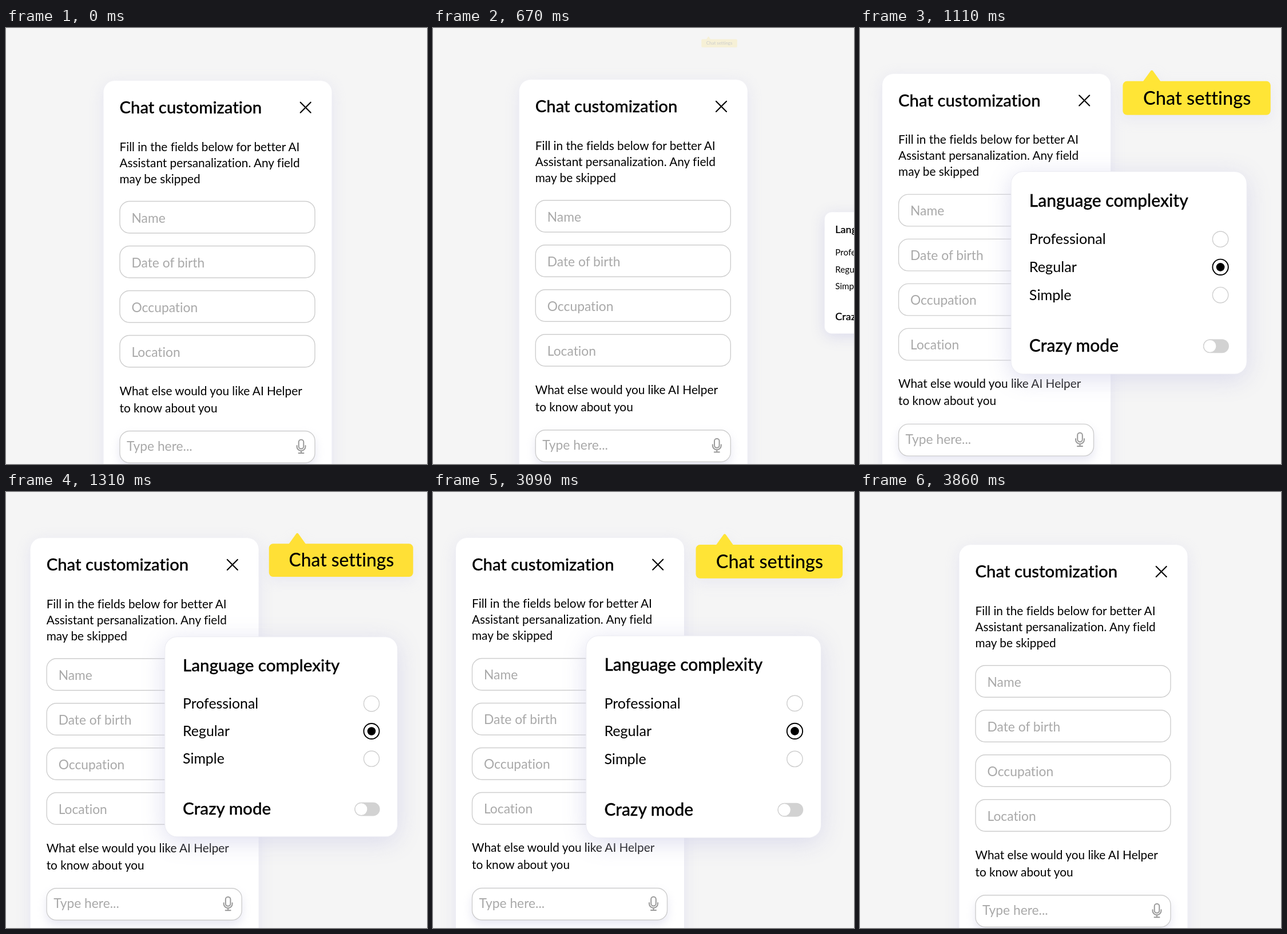
Animation, 736 px wide and 761 px high, one loop 4.17 s. Source, as an HTML page:

```html
<!DOCTYPE html>
<html lang="en">
<head>
<meta charset="utf-8">
<title>Chat customization</title>
<style>
  html, body { margin: 0; width: 100%; height: 100%; overflow: hidden; background: #f5f5f5; }
  svg { display: block; width: 736px; height: 761px; }
  text { font-family: Lato, "Open Sans", sans-serif; font-variant-ligatures: none; white-space: pre; }
  .heading { font-size: 29.3px; font-weight: 500; stroke: #000; stroke-width: .3; }
  .body { font-size: 20.8px; }
  .hint { font-size: 22.8px; fill: #a9a9a9; }
  .option { font-size: 24.6px; }
  .label { font-size: 31.2px; font-weight: 500; }
  .card { fill: #fff; }
  .field { fill: #fff; stroke: #cecece; stroke-width: 1.4; }
  .line { fill: none; stroke: #000; stroke-width: 2.1; stroke-linecap: round; }
  .mic { fill: none; stroke: #999; stroke-width: 2; stroke-linecap: round; }
  .radio { fill: #fff; stroke: #cfcfcf; stroke-width: 1.4; }
  .radio.on { stroke: #000; stroke-width: 1.9; }
  #form > .card { filter: drop-shadow(0 6px 13px rgba(204, 204, 236, .42)); }
  #settings > .card { stroke: #ececf2; filter: drop-shadow(0 8px 20px rgba(208, 208, 232, .7)); }
  #message { filter: drop-shadow(0 8px 8px rgba(205, 205, 228, .45)); }
  #tooltip { filter: drop-shadow(0 8px 10px rgba(208, 208, 235, .3)); }
</style>
</head>
<body>
<svg viewBox="0 0 736 761">
  <g id="form">
    <rect class="card" x="170.5" y="92" width="399" height="800" rx="20"/>
    <text class="heading" x="198.5" y="149">Chat customization</text>
    <path class="line" d="M514.7 129.7l18 18m0-18l-18 18"/>
    <text class="body" x="198.5" y="214.5">Fill in the fields below for better AI</text>
    <text class="body" x="198.5" y="242.5">Assistant persanalization. Any field</text>
    <text class="body" x="198.5" y="270.5">may be skipped</text>
    <g id="fields"></g>
    <text class="body" x="198.5" y="640.5">What else would you like AI Helper</text>
    <text class="body" x="198.5" y="670.5">to know about you</text>
    <rect id="message" class="field" x="199" y="703.5" width="341" height="55.5" rx="17"/>
    <text class="hint" x="211" y="738">Type here...</text>
    <rect class="mic" x="511.7" y="718.5" width="8.6" height="16" rx="4.3"/>
    <path class="mic" d="M508.5 729v1.5a7.5 7.5 0 0 0 15 0V729M516 738v4M511.5 742h9"/>
  </g>
  <g id="settings">
    <rect class="card" width="402.5" height="345.5" rx="21"/>
    <text class="heading" x="31" y="60">Language complexity</text>
    <g id="options"></g>
    <text class="heading" x="31" y="307.5">Crazy mode</text>
    <rect x="328" y="286" width="44" height="23.5" rx="11.75" fill="#d2d2d2"/>
    <circle cx="339.7" cy="297.75" r="10.8" fill="#fff" stroke="#d2d2d2"/>
  </g>
  <g id="tooltip">
    <g id="bubble">
      <rect width="247" height="56.5" rx="7"/>
      <path d="M33.5 1L46.5-17Q48.5-19.5 50.5-17L63.5 1Z"/>
    </g>
    <text class="label" x="34" y="39">Chat settings</text>
  </g>
</svg>
<script>
const $ = id => document.getElementById(id);

$("fields").innerHTML = ["Name", "Date of birth", "Occupation", "Location"].map((name, i) => {
  const y = 302.5 + 78 * i;
  return `<rect class="field" x="199" y="${y}" width="341" height="55.5" rx="17"/>
    <text class="hint" x="219.5" y="${y + 37}">${name}</text>`;
}).join("");

$("options").innerHTML = ["Professional", "Regular", "Simple"].map((name, i) => {
  const y = 115.5 + 47.6 * i, on = name === "Regular";
  return `<text class="option" x="31" y="${y + 8.5}">${name}</text>
    <circle class="radio ${on ? "on" : ""}" cx="357.5" cy="${y}" r="13.4"/>` +
    (on ? `<circle cx="357.5" cy="${y}" r="7.2"/>` : "");
}).join("");

const LOOP = 4170, LAST_STEP = 23;
const clamp = v => Math.min(1, Math.max(0, v));

// Ease in-out with overshoot: cubic-bezier(.7, -.4, .4, 1.4)
function easeBack(x) {
  x = clamp(x);
  const bezier = (s, a, b) => 3 * (1 - s) ** 2 * s * a + 3 * (1 - s) * s * s * b + s ** 3;
  let low = 0, high = 1;
  for (let i = 0; i < 30; i++) {
    const mid = (low + high) / 2;
    if (bezier(mid, .7, .4) < x) low = mid; else high = mid;
  }
  return bezier(low, -.4, 1.4);
}

// The picture advances in steps and rests on the last one.
function stepped(t, start, step) {
  return start + step * Math.min(LAST_STEP, Math.floor((t - start) / step));
}

function progress(t) {
  if (t < 180) return 0;
  if (t < 2750) return easeBack((stepped(t, 180, 49) - 152) / 1200);
  return 1 - easeBack((stepped(t, 2750, 48) - 2801) / 1097);
}

function place(id, x, y, scale = 1) {
  $(id).setAttribute("transform", `translate(${x} ${y}) scale(${scale})`);
}

function draw(t) {
  const p = progress(t), rest = 1 - p;
  place("form", -125 * p, -11.5 * p);
  place("settings", 288.5 + 470 * rest, 254.5 + 79 * rest, 1 - .457 * rest);
  place("tooltip", 460 + 11 * rest, 88.5 - 82 * rest, 1 - .887 * rest);
  $("tooltip").setAttribute("opacity", clamp(p));
  $("bubble").setAttribute("fill", `rgb(255 ${219 + 200 * Math.max(0, -rest)} 54)`);
}

const begin = performance.now();
function tick() {
  draw((performance.now() - begin) % LOOP);
  requestAnimationFrame(tick);
}
tick();
</script>
</body>
</html>
```
